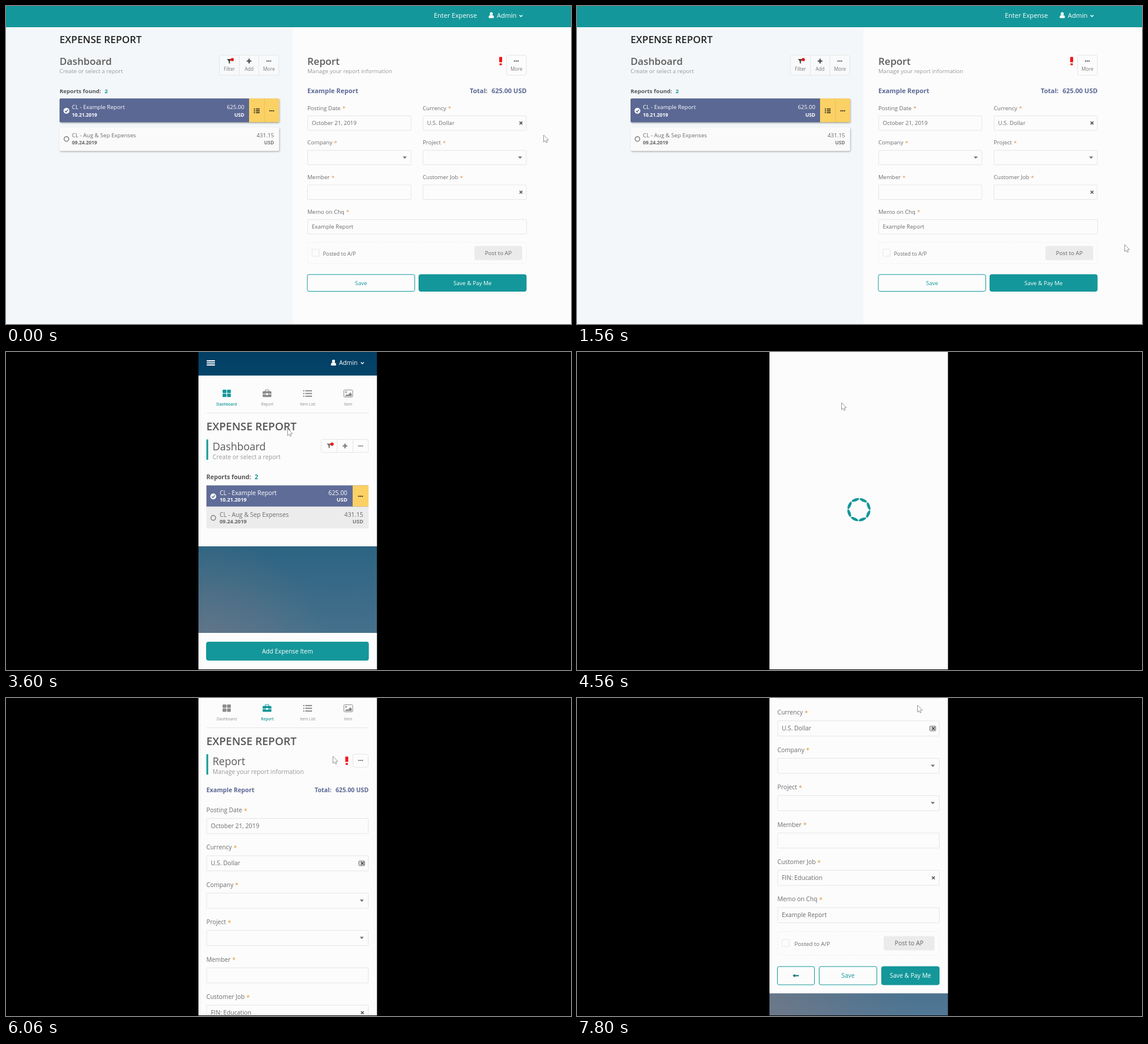
Animation of 960x540 px, one loop 8 s. Source, as an HTML page with a canvas:

```html
<!DOCTYPE html>
<html lang="en">
<head>
<meta charset="utf-8">
<title>Expense report</title>
<style>
html, body { margin: 0; width: 100%; height: 100%; overflow: hidden; background: #000; }
canvas { display: block; width: 960px; height: 540px; }
</style>
</head>
<body>
<canvas id="stage" width="960" height="540"></canvas>
<script>
const ctx = document.getElementById('stage').getContext('2d');
const LOOP = 8000, STEP = 60;
const TEAL = '#14979a', INDIGO = '#5b6894', YELLOW = '#fbd165', GREY = '#6c6c6c', LINE = '#e6e6e6', PAGE = '#fcfcfc';
const LEFT = 327, RIGHT = 630.5;

// Each key is [time, ...values]; values are interpolated linearly.
function track(t, keys) {
  if (t <= keys[0][0]) return keys[0].slice(1);
  for (let i = 1; i < keys.length; i++) {
    const a = keys[i - 1], b = keys[i];
    if (t < b[0]) {
      const k = (t - a[0]) / (b[0] - a[0]);
      return a.slice(1).map((v, j) => v + (b[j + 1] - v) * k);
    }
  }
  return keys[keys.length - 1].slice(1);
}

// y is the middle of the capital letters.
function text(s, x, y, size, color, weight = 400, align = 'left') {
  ctx.font = `${weight} ${size}px "Open Sans", sans-serif`;
  ctx.textAlign = align;
  ctx.fillStyle = color;
  ctx.fillText(s, x, y + size * 0.36);
  return ctx.measureText(s).width;
}

function rect(x, y, w, h, color) {
  ctx.fillStyle = color;
  ctx.fillRect(x, y, w, h);
}

function box(x, y, w, h, r, fill, stroke, dash = []) {
  ctx.beginPath();
  ctx.roundRect(x, y, w, h, r);
  if (fill) { ctx.fillStyle = fill; ctx.fill(); }
  if (stroke) {
    ctx.setLineDash(dash);
    ctx.strokeStyle = stroke;
    ctx.lineWidth = 1;
    ctx.stroke();
    ctx.setLineDash([]);
  }
}

function shape(points, fill) {
  ctx.beginPath();
  points.forEach(([x, y]) => ctx.lineTo(x, y));
  ctx.closePath();
  ctx.fillStyle = fill;
  ctx.fill();
}

function stroke(points, color, width = 1) {
  ctx.beginPath();
  points.forEach(([x, y], i) => i ? ctx.lineTo(x, y) : ctx.moveTo(x, y));
  ctx.strokeStyle = color;
  ctx.lineWidth = width;
  ctx.stroke();
}

function disc(x, y, r, fill) {
  ctx.beginPath();
  ctx.arc(x, y, r, 0, 7);
  ctx.fillStyle = fill;
  ctx.fill();
}

function button(label, x, y, w, h, size, solid) {
  box(x, y, w, h, 3, solid ? TEAL : PAGE, TEAL);
  text(label, x + w / 2, y + h / 2, size, solid ? '#fff' : TEAL, 400, 'center');
}

function dots(x, y, color = '#555') {
  for (const d of [-3, 0, 3]) rect(x + d - 1, y - 1, 2, 2, color);
}

function plus(x, y, color) {
  rect(x - 4, y - 1, 8, 2, color);
  rect(x - 1, y - 4, 2, 8, color);
}

function funnel(x, y, color) {
  shape([[x - 4, y - 4], [x + 4, y - 4], [x + 1, y], [x + 1, y + 4], [x - 1, y + 3], [x - 1, y]], color);
  disc(x + 5, y - 3, 2.7, '#f21212');
}

function alertMark(x, y) {
  rect(x - 2.5, y - 7, 5, 9, '#f01616');
  rect(x - 2, y + 4, 4, 3, '#f01616');
}

function person(x, y) {
  disc(x, y - 2.5, 2.6, '#fff');
  box(x - 4.3, y, 8.6, 5, [3, 3, 1, 1], '#fff');
}

function chevron(x, y) {
  stroke([[x - 2.5, y - 1], [x, y + 1.5], [x + 2.5, y - 1]], '#fff', 1.5);
}

function listIcon(x, y, w, color) {
  for (const d of [-1, 0, 1]) {
    const row = y + d * w * 0.31 - 1;
    rect(x - w / 2, row, 2, 2, color);
    rect(x - w / 2 + 3.5, row, w - 3.5, 2, color);
  }
}

function radio(x, y, on) {
  if (on) {
    disc(x, y, 5, '#fff');
    stroke([[x - 2.5, y], [x - 0.7, y + 2], [x + 2.6, y - 2]], INDIGO, 1.4);
  } else {
    ctx.beginPath();
    ctx.arc(x, y, 4, 0, 7);
    ctx.strokeStyle = '#666';
    ctx.lineWidth = 1.2;
    ctx.stroke();
  }
}

function cross(x, y) {
  stroke([[x - 2.4, y - 2.4], [x + 2.4, y + 2.4]], '#555', 1.6);
  stroke([[x + 2.4, y - 2.4], [x - 2.4, y + 2.4]], '#555', 1.6);
}

function field(f, x, y, w, h, size, gap, boxed) {
  const [label, value, icon] = f, mid = y + h / 2;
  const end = x + text(label, x, y - gap, size, GREY);
  text('*', end + 3, y - gap + 0.5, size, '#e5a45c', 600);
  box(x + 0.5, y + 0.5, w - 1, h - 1, 1, PAGE, LINE);
  if (value) text(value, x + 7.5, mid, size, '#6a6a6a');
  const ix = x + w - (boxed ? 11.5 : 11);
  if (icon === 'list') shape([[ix - 3.5, mid - 2], [ix + 3.5, mid - 2], [ix, mid + 2]], '#777');
  if (icon === 'card') {
    box(ix - 5, mid - 4, 10, 8, 1, '#ddd', '#777');
    cross(ix + 1, mid);
  }
  if (icon === 'clear') cross(boxed ? ix + 1 : ix + 1.5, mid);
}

function item(x, y, w, h, size, small, date, title, sum, on, right) {
  const color = on ? '#fff' : GREY;
  const up = y + h * 0.36, down = y + h * 0.68;
  radio(x + 11.7, y + h * 0.52, on);
  text(title, x + w, up, size, color);
  text(date, x + w, down, small, on ? '#fff' : '#666', 700);
  text(sum, right, up, size, color, 400, 'right');
  text('USD', right, down, small, on ? '#fff' : '#777', 700, 'right');
}

function count(x, y, size, gap) {
  const w = text('Reports found:', x, y, size, '#555', 700);
  text('2', x + w + gap, y, size, TEAL, 700);
}

function summary(x, right, totalX, y, size) {
  text('Example Report', x, y, size, INDIGO, 700);
  text('Total:', totalX, y, size, INDIGO, 700);
  text('625.00 USD', right, y, size, INDIGO, 700, 'right');
}

function postRow(x, y, w, h, size, small, bx, bw) {
  box(x + 0.5, y + 0.5, w - 1, h - 1, 2, null, '#ededed', [2, 2]);
  box(x + 8, y + h / 2 - 6.5, 12, 12, 1, PAGE, LINE);
  const tx = x + (size > 10 ? 29 : 26.5);
  text('Posted to A/P', tx, y + h / 2 + 1, small, GREY);
  box(bx, y + h / 2 - 12, bw, 24, 3, '#ebebeb');
  text('Post to AP', bx + bw / 2, y + h / 2, size, '#666', 400, 'center');
}

const FIELDS = [
  ['Posting Date', 'October 21, 2019'], ['Currency', 'U.S. Dollar', 'card'],
  ['Company', '', 'list'], ['Project', '', 'list'],
  ['Member', ''], ['Customer Job', 'FIN: Education', 'clear'], ['Memo on Chq', 'Example Report']
];

function desktop() {
  const S = 9.55;
  rect(0, 0, 960, 540, PAGE);
  rect(0, 36, 487, 504, '#f4f7f9');
  rect(0, 0, 960, 36, TEAL);
  text('Enter Expense', 727, 16.5, 11, '#fff');
  person(824.5, 15.5);
  text('Admin', 834, 16.5, 11, '#fff');
  chevron(875, 16.5);

  text('EXPENSE REPORT', 91, 56.5, 16.8, '#222', 600);
  text('Dashboard', 91, 94, 16.8, '#5c5c5c', 600);
  text('Create or select a report', 91, 111, S, '#999');
  box(362.5, 83.5, 101, 34, 3, '#f8f9fa', LINE);
  rect(396, 84, 1, 33, LINE);
  rect(429, 84, 1, 33, LINE);
  funnel(379.5, 94, '#444');
  plus(413, 93.5, '#444');
  dots(446.5, 93.5);
  [['Filter', 379.5], ['Add', 413], ['More', 446.7]].forEach(([s, x]) => text(s, x, 107.5, 8.2, '#777', 400, 'center'));
  count(91, 144.5, S, 6);

  ctx.save();
  ctx.shadowColor = 'rgba(0,0,0,.28)';
  ctx.shadowBlur = 3;
  ctx.shadowOffsetY = 1.5;
  ctx.shadowOffsetX = 1;
  box(91, 157, 373, 40.5, 2, INDIGO);
  box(91, 206, 373, 40, 2, '#fafafa');
  ctx.restore();
  rect(413, 157, 51, 40.5, YELLOW);
  rect(438.5, 157, 1, 40.5, '#e6c066');
  listIcon(426, 178, 10, '#554a2a');
  dots(451.5, 178, '#443a20');
  item(91, 157, 21, 40.5, S, 8.35, '10.21.2019', 'CL - Example Report', '625.00', true, 405);
  item(91, 205, 21, 40, S, 8.35, '09.24.2019', 'CL - Aug & Sep Expenses', '431.15', false, 455.5);

  text('Report', 512, 94, 16.8, '#5c5c5c', 600);
  text('Manage your report information', 512, 111, S, '#999');
  alertMark(840.5, 93.5);
  box(850.5, 83.5, 33.5, 34, 3, PAGE, LINE);
  dots(867, 93.5);
  text('More', 867.2, 107.5, 8.2, '#777', 400, 'center');
  summary(512, 884.5, 788, 144.5, 10.95);
  FIELDS.forEach(([label, value, icon], i) => {
    const wide = i === 6;
    const f = [label, i === 5 ? '' : value, i === 1 ? 'clear' : icon];
    field(f, i % 2 ? 708 : 512, 186 + 58.7 * (i >> 1), wide ? 373 : 176.5, 25.5, S, 12.7);
  });
  postRow(512, 401, 373, 37, S, 8.9, 796, 81);
  button('Save', 512, 456, 182.5, 28.5, S, false);
  button('Save & Pay Me', 701.5, 456, 182.5, 28.5, S, true);
}

const MENU = [
  ['Back', 229.5], ['Forward', 245.2], ['Reload', 261], ['Save as...', 284.2], ['Print...', 299.8],
  ['Cast...', 315.6], ['Translate to English', 331.4], ['Block element...', 354.7],
  ['Quillock', 370.4], ['View page source', 393.8], ['Inspect', 409.5]
];

function contextMenu(hoverY) {
  ctx.save();
  ctx.shadowColor = 'rgba(0,0,0,.35)';
  ctx.shadowBlur = 4;
  ctx.shadowOffsetY = 1;
  rect(862, 218.5, 110, 200.5, '#fff');
  ctx.restore();
  box(862.5, 218.5, 110, 200, 0, '#fcfcfc', '#b9b9b9');
  for (const [label, y] of MENU) {
    if (Math.abs(hoverY - y) < 7.85) rect(863, y - 7.8, 97, 15.6, '#e2e5ec');
    text(label, 884, y, 7.75, '#444');
  }
  for (const y of [272.5, 343, 382]) rect(863, y, 97, 1, '#f1f1f1');
  disc(873, 354.5, 5, '#4a4348');
  rect(868, 365, 10.5, 10.5, '#e32417');
}

function sky() {
  let g = ctx.createLinearGradient(0, 0, 0, 540);
  [[0, '#023e63'], [0.075, '#06456a'], [0.61, '#2c6482'], [0.88, '#45708c'], [1, '#527795']]
    .forEach(([p, c]) => g.addColorStop(p, c));
  rect(LEFT, 0, RIGHT - LEFT, 540, g);
  g = ctx.createRadialGradient(LEFT, 540, 20, LEFT, 540, 230);
  g.addColorStop(0, 'rgba(125,122,132,.6)');
  g.addColorStop(1, 'rgba(125,122,132,0)');
  rect(LEFT, 300, RIGHT - LEFT, 240, g);
}

function tabs(active) {
  const tone = i => i === active ? TEAL : '#8c8c8c';
  for (const [dx, dy] of [[0, 0], [7.5, 0], [0, 6.8], [7.5, 6.8]]) box(368 + dx, 64 + dy, 6.5, 5.8, 1, tone(0));
  box(436, 66.5, 15, 10, 1.5, tone(1));
  box(440.5, 64, 6, 4, 1, null, tone(1));
  rect(436, 71, 15, 1, '#fff');
  rect(442, 70, 3, 3, '#fff');
  listIcon(512.5, 70.5, 15, tone(2));
  box(574, 64.5, 15, 12, 1.5, null, tone(3));
  disc(577.7, 68, 1.5, tone(3));
  shape([[575.5, 75], [579, 71.5], [581, 73], [585, 68.5], [587.5, 71.5], [587.5, 75]], tone(3));
  ['Dashboard', 'Report', 'Item List', 'Item'].forEach((s, i) =>
    text(s, 375 + 69 * i - (i > 1 ? 0.5 : 0), 88.5, 6.6, tone(i), i === active ? 600 : 400, 'center'));
  rect(340.5, 103, 275.5, 1, LINE);
}

function phoneTop(active, title, subtitle) {
  for (const y of [14, 17.5, 21]) rect(341, y, 14, 2, '#fff');
  person(556.5, 18);
  text('Admin', 566, 18.7, 10.3, '#fff');
  chevron(605.5, 18.5);
  tabs(active);
  text('EXPENSE REPORT', 340.5, 126.5, 18.45, '#565656', 600);
  rect(340.5, 148.5, 3, 34.5, TEAL);
  text(title, 351, 160.5, 17.55, '#5a5a5a');
  text(subtitle, 351, 178, 10.28, '#999');
}

function dashboard() {
  const S = 10.3;
  rect(LEFT, 40, RIGHT - LEFT, 290, PAGE);
  phoneTop(0, 'Dashboard', 'Create or select a report');
  box(535.5, 148.5, 80, 22, 3, PAGE, LINE);
  rect(562, 149, 1, 21, LINE);
  rect(589, 149, 1, 21, LINE);
  funnel(549, 159.5, '#777');
  plus(576, 159.5, '#777');
  dots(602.5, 159.5, '#777');
  count(340.5, 212.5, S, 6);
  rect(340.5, 226.5, 275.5, 36, '#5f6c98');
  rect(589, 226.5, 27, 36, YELLOW);
  dots(602.5, 245, '#443a20');
  rect(340.5, 263, 275.5, 36.5, '#ececec');
  item(340.5, 226.5, 22.5, 36, S, 8.95, '10.21.2019', 'CL - Example Report', '625.00', true, 580);
  item(340.5, 263, 22.5, 36, S, 8.95, '09.24.2019', 'CL - Aug & Sep Expenses', '431.15', false, 607);
  rect(LEFT, 477, RIGHT - LEFT, 63, PAGE);
  button('Add Expense Item', 340.5, 492.5, 275.5, 31, S, true);
}

function report(scroll) {
  const S = 10.3;
  ctx.save();
  ctx.translate(0, -scroll);
  rect(LEFT, 40, RIGHT - LEFT, 743.5, PAGE);
  phoneTop(1, 'Report', 'Manage your report information');
  alertMark(579, 159.5);
  box(589.5, 148.5, 26, 22, 3, PAGE, LINE);
  dots(602.5, 159, '#777');
  summary(340.5, 616, 524.5, 209.5, S);
  FIELDS.forEach((f, i) => field(f, 340.5, 257 + 63.4 * i, 275.5, 26.7, S, 13.7, true));
  postRow(340.5, 678, 275.5, 41, S, 9.6, 521, 86.5);
  button('', 340.5, 738, 63, 31, S, false);
  stroke([[368, 753.5], [377, 753.5]], '#14777a', 1.8);
  shape([[366.5, 753.5], [370.5, 750.5], [370.5, 756.5]], '#14777a');
  button('Save', 411.5, 738, 98, 31, S, false);
  button('Save & Pay Me', 517.5, 738, 98, 31, S, true);
  ctx.restore();
}

function loader(t) {
  rect(LEFT, 0, RIGHT - LEFT, 540, PAGE);
  const turn = (25 + (t - 4560) * 0.36) * Math.PI / 180;
  ctx.save();
  ctx.translate(479, 267.7);
  ctx.rotate(turn);
  ctx.fillStyle = TEAL;
  for (let i = 0; i < 8; i++) {
    ctx.beginPath();
    ctx.ellipse(17.5, 0, 2.4, 6.8, 0, 0, 7);
    ctx.fill();
    ctx.rotate(Math.PI / 4);
  }
  ctx.restore();
}

function cursor([x, y]) {
  ctx.save();
  ctx.translate(x + 0.5, y);
  shape([[0, 0], [0, 12], [2.7, 9.6], [4.5, 13.3], [6.3, 12.5], [4.7, 8.9], [8.3, 8.6]], '#fff');
  ctx.strokeStyle = '#8a8a8a';
  ctx.lineWidth = 0.9;
  ctx.stroke();
  ctx.restore();
}

const deskPath = [[360, 913, 219], [780, 954, 310], [1140, 942, 373], [1320, 930, 405]];
const tapPath = [[3180, 632, 380], [3420, 545, 235], [3600, 478, 130], [3780, 449, 86]];
const scrollPath = [[5040, 610, 119], [5220, 588, 116], [5400, 588, 116], [6060, 555, 99], [7020, 567, 139], [7800, 578, 12]];
const scrollKeys = [[5400, 0], [6060, 53], [7020, 145], [7800, 282]];

function phone(t) {
  rect(0, 0, 960, 540, '#000');
  ctx.save();
  ctx.beginPath();
  ctx.rect(LEFT, 0, RIGHT - LEFT, 539);
  ctx.clip();
  sky();
  if (t < 4080) dashboard();
  else if (t < 4920) loader(t);
  else report(track(t, scrollKeys)[0]);
  if (t >= 3240) cursor(track(t, t < 4920 ? tapPath : scrollPath));
  ctx.restore();
}

function draw(t) {
  if (t >= 1980) return phone(t);
  desktop();
  if (t >= 120 && t < 1380) {
    ctx.globalAlpha = t < 180 ? 0.7 : 1;
    contextMenu(track(t - STEP, deskPath)[1]);
    ctx.globalAlpha = 1;
  }
  cursor(track(t, deskPath));
}

let start;
function tick(now) {
  start ??= now;
  const t = (now - start) % LOOP;
  draw(Math.floor(t / STEP) * STEP);
  requestAnimationFrame(tick);
}
requestAnimationFrame(tick);
</script>
</body>
</html>
```
